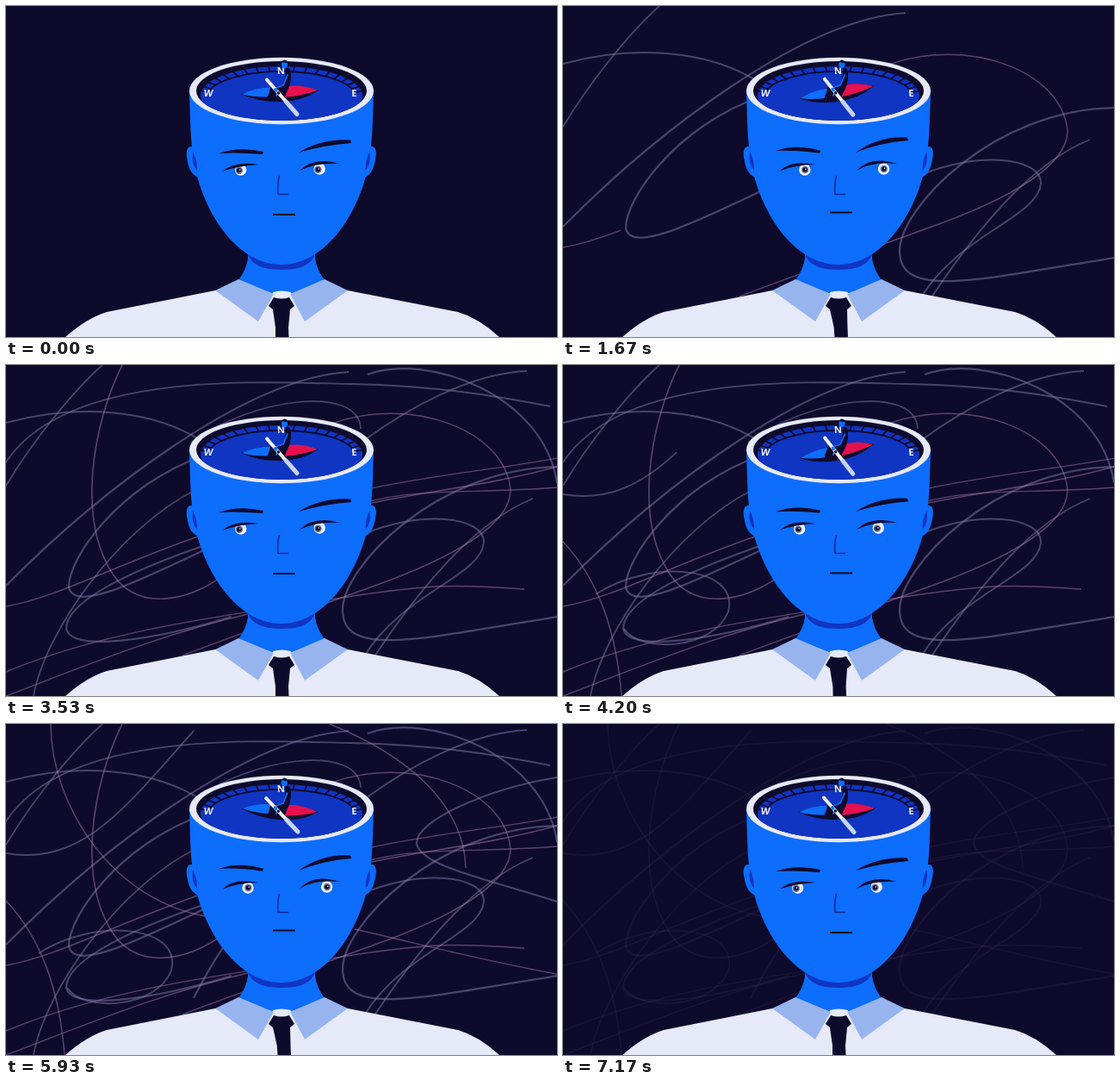
An HTML page with a canvas that plays this animation: 640 px wide and 384 px high, repeating every 7210 ms.

```html
<!DOCTYPE html>
<html lang="en">
<head>
<meta charset="utf-8">
<title>Inner compass</title>
<style>
  html, body { margin: 0; width: 100%; height: 100%; overflow: hidden; background: #0e0a2c; }
  canvas { display: block; width: 640px; height: 384px; }
</style>
</head>
<body>
<canvas id="stage" width="640" height="384"></canvas>
<script>
const ctx = document.getElementById('stage').getContext('2d');
const LOOP = 7210, SWAY = LOOP / 2;
const NIGHT = '#0e0a2c', SKIN = '#0d6dfd', DEEP = '#1035c3', SHIRT = '#e6e9f8',
      COLLAR = '#97b4ef', RED = '#e6104f', WHITE = '#f1f3fd';

const mix = (a, b, k) => a + (b - a) * k;

// Cosine easing through [phase, value] pairs.
function keyed(p, keys) {
  for (let i = 1; i < keys.length; i++) {
    const [p0, v0] = keys[i - 1], [p1, v1] = keys[i];
    if (p <= p1) return mix(v0, v1, (1 - Math.cos(Math.PI * (p - p0) / (p1 - p0))) / 2);
  }
  return keys[keys.length - 1][1];
}

function fill(color, d) {
  ctx.fillStyle = color;
  ctx.fill(new Path2D(d));
}

function line(color, width, d) {
  ctx.strokeStyle = color;
  ctx.lineWidth = width;
  ctx.stroke(new Path2D(d));
}

function oval(color, x, y, rx, ry = rx) {
  ctx.fillStyle = color;
  ctx.beginPath();
  ctx.ellipse(x, y, rx, ry, 0, 0, 7);
  ctx.fill();
}

// Pen lines: start time, duration, path, width.
const strokes = [];
function pen(start, span, d, width = 1.5) {
  const el = document.createElementNS('http://www.w3.org/2000/svg', 'path');
  el.setAttribute('d', d);
  strokes.push({ start, span, width, path: new Path2D(d), len: el.getTotalLength() });
}

pen(60, 300, 'M612 155C550 180 490 245 428 338', 1.5);
pen(260, 330, 'M640 118C500 120 390 235 391 285C392 340 480 318 640 292', 1.8);
pen(500, 320, 'M414 197C480 168 556 175 555 206C552 245 460 265 416 338', 1.6);
pen(480, 490, 'M205 337C270 312 360 281 420 259C520 224 586 185 586 145C580 75 470 35 378 68', 1.2);

pen(970, 230, 'M112 0C76 32 30 90 0 140');
pen(1080, 320, 'M398 8C280 15 110 145 0 256', 1.7);
pen(1330, 340, 'M230 105C130 140 72 225 73 258C80 288 155 250 240 210', 1.8);
pen(1450, 220, 'M0 67C80 45 170 50 230 90', 1.5);
pen(1600, 260, 'M0 280C60 270 130 230 240 193', 1.1);
pen(1750, 330, 'M0 356C120 306 260 290 390 270S540 257 602 260', 1.2);
pen(1860, 200, 'M0 384C90 350 180 312 285 288', 1.1);
pen(1900, 200, 'M605 7C540 10 470 48 415 88', 1.6);
pen(2000, 190, 'M415 145C490 128 570 121 640 108', 1);
pen(2130, 180, 'M415 162C490 146 560 140 640 118', 1.3);

pen(2330, 290, 'M0 113C70 5 300 20 400 22S570 36 632 48', 1.5);
pen(2560, 320, 'M135 0C100 70 82 180 125 244C155 288 220 275 268 232', 1.3);
pen(2830, 270, 'M420 11C490 -15 625 35 640 137', 1.7);
pen(3030, 200, 'M215 90C285 38 410 22 412 74', 1.4);
pen(3130, 240, 'M32 384C45 310 130 190 220 145', 1.4);
pen(3270, 240, 'M240 206C140 240 70 275 70 306C76 333 170 320 262 292', 1.7);
pen(3350, 180, 'M415 160C480 142 540 150 640 142', 1.1);

pen(3570, 320, 'M38 266C100 225 205 232 192 286C175 330 90 335 71 306', 1.6);
pen(3820, 250, 'M0 205C42 250 62 310 68 384', 1.2);
pen(4040, 300, 'M0 150C90 165 140 95 218 8', 1.5);
pen(4280, 400, 'M640 62C560 75 475 112 477 139C482 165 560 180 640 206', 1.7);

pen(4920, 340, 'M52 0C52 95 125 208 238 224', 1.2);
pen(5230, 250, 'M376 0C470 38 532 95 534 167', 1.2);
pen(5460, 200, 'M218 318C235 284 250 260 270 235', 1.7);
pen(5630, 270, 'M405 238C480 255 560 276 640 290', 1.1);

function scribble(t) {
  const fade = Math.min(1, Math.max(0, (7250 - t) / 500));
  ctx.globalAlpha = 0.5 * fade;
  ctx.lineCap = 'butt';
  for (const s of strokes) {
    const k = Math.min(1, (t - s.start) / s.span);
    if (k <= 0) continue;
    ctx.strokeStyle = s.width < 1.4 ? '#a27fae' : '#847da5';
    ctx.lineWidth = s.width * 1.25;
    ctx.setLineDash(k < 1 ? [s.len * k, s.len + 10] : []);
    ctx.stroke(s.path);
  }
  ctx.setLineDash([]);
  ctx.globalAlpha = 1;
  ctx.lineCap = 'round';
}

function bust(look) {
  fill(SHIRT, 'M69 384Q94 362 117 355L243 330L311 331H330L397 330L525 355Q549 362 573 384Z');
  fill(SKIN, 'M281 280V293Q279 306 270 318L308 333H333L370 318Q361 306 359 293V280Z');
  fill(DEEP, 'M281 288Q287 306 320 306Q353 306 359 288Z');
  fill(SHIRT, 'M310 332Q320 329 331 332L329 340H312Z');
  fill(COLLAR, 'M270 317L243 330L293 366L311 334Z');
  fill(COLLAR, 'M370 317L397 330L347 366L330 334Z');
  const s = look * 2.5;
  fill(NIGHT, `M311 338Q320 341 329 338L335 348L330 352L${328 + s} 373L${328.5 + s} 384` +
    `H${313 + s}L${313 + s * .7} 373L310 352L305 348Z`);

  fill(SKIN, 'M219 164C210 160 208.5 169 210.5 178C212 190 217 197 226 200Z');
  fill(SKIN, 'M421 164C430 160 431 169 429 178C427 190 423 197 414 200Z');
  fill(SKIN, 'M213 98C214 130 214 150 217 170C222 225 262 300 320 300' +
    'C378 300 418 225 423 170C426 150 426 130 427 98Z');
  fill(DEEP, 'M217 169Q222 177 222 191Q215 183 217 169Z');
  fill(DEEP, 'M422.5 169Q417.5 177 417.5 191Q424.5 183 422.5 169Z');
}

function eye(x, y, look) {
  oval(WHITE, x, y, 6.7);
  const px = x + mix(-1.8, .3, look), py = y + mix(.8, 0, look);
  oval('#6f7bab', px, py, 4.2);
  oval(NIGHT, px, py, 2.7);
  oval(WHITE, px + .8, py - .8, .8);
}

function face(look) {
  const x = mix(272.6, 281, look), up = look * 3;
  eye(x, 190, look);
  eye(x + 91.6, 189, look);
  const l = look * 1.5;
  fill(NIGHT, `M252 191.5Q${266 - l} ${179.5 - l} 293 184Q${270 - l} ${185.5 - l} 252 191.5Z`);
  fill(NIGHT, `M341 191Q${358 - l} ${174.5 - l} 388 183Q${360 - l} ${181.5 - l} 341 191Z`);
  fill(NIGHT, `M247 ${171 - up}Q270 ${162.5 - up} 299 ${169 - up * .4}L298 ${172 - up * .4}` +
    `Q269 ${169.5 - up} 247 ${171 - up}Z`);
  fill(NIGHT, `M340 170Q367 ${153.5 - up} 400 ${155.5 - up}L401 ${159 - up}Q368 ${161.5 - up} 340 170Z`);
  ctx.lineCap = 'butt';
  line('#142a9c', 1.6, 'M317.5 197Q315 207 316 218.5H328');
  line(NIGHT, 2, `M310 ${242 - look * 2.5}H336`);
  ctx.lineCap = 'round';
}

function letter(ch, x, y, skew) {
  ctx.save();
  ctx.transform(1, 0, skew, 1, x, y);
  ctx.fillStyle = WHITE;
  ctx.fillText(ch, 0, 0);
  ctx.restore();
}

function dial() {
  oval(SHIRT, 320, 98.5, 107, 38.7);
  ctx.save();
  ctx.beginPath();
  ctx.ellipse(320, 98.5, 99, 34.5, 0, 0, 7);
  ctx.clip();
  oval(NIGHT, 320, 98.5, 100, 36);
  oval(DEEP, 320, 104, 94, 34);
  ctx.strokeStyle = NIGHT;
  ctx.lineWidth = 1.8;
  ctx.beginPath();
  ctx.ellipse(320, 105, 86, 29, 0, Math.PI * 1.06, Math.PI * 1.94);
  ctx.stroke();
  for (let a = 189; a <= 351; a += 9) {
    const c = Math.cos(a * Math.PI / 180), s = Math.sin(a * Math.PI / 180);
    ctx.beginPath();
    ctx.moveTo(320 + 95 * c, 104 + 34 * s);
    ctx.lineTo(320 + 86 * c, 105 + 29 * s);
    ctx.stroke();
  }
  ctx.restore();
}

function letters() {
  ctx.font = '700 11px "Open Sans", "Noto Sans", sans-serif';
  ctx.textAlign = 'center';
  ctx.textBaseline = 'middle';
  letter('N', 319.5, 76, .08);
  letter('W', 235, 102.5, -.15);
  letter('E', 404.5, 102.5, .05);
}

function rower(deg) {
  const a = deg * Math.PI / 180, tx = Math.cos(a * .75), ty = -.4 * Math.sin(a);
  const pt = (u, v) => `${318 + u * tx} ${100 + u * ty + v} `;
  fill(NIGHT, `M${pt(-45, 1)}Q${pt(-22, -7)}${pt(0, -7)}Q${pt(25, -8)}${pt(45, -1)}` +
    `Q${pt(25, 12)}${pt(0, 11)}Q${pt(-24, 11)}${pt(-45, 1)}Z`);
  fill(SKIN, `M${pt(-44, 1)}Q${pt(-28, -6)}${pt(-11, -6)}L${pt(-13, 5)}Q${pt(-30, 5)}${pt(-44, 1)}Z`);
  fill(RED, `M${pt(10, -7)}Q${pt(28, -8)}${pt(44, -1)}Q${pt(26, 5)}${pt(6, 6)}Z`);

  const k = (deg - 4) / 33, lean = k * .8;
  ctx.lineJoin = 'round';
  line(NIGHT, 4.5, 'M323 98L310 95L306 106');
  line(NIGHT, 4.5, 'M324 99L316 99L313 107');
  fill(NIGHT, `M${325 + lean} 72Q330 70 331 78Q332 92 324 103L318 99Q325 89 ${325 + lean} 72Z`);
  line(SKIN, 1.8, `M${327 + lean} 80L322 92L313 95`);
  line('#3c86f4', 1.6, 'M316 99L314 104');
  oval(SKIN, 323.5 + lean, 68, 3.6, 4);
  fill(NIGHT, `M${320 + lean} 65Q${323 + lean} 60 ${328 + lean} 65L${325 + lean} 66Z`);

  const x0 = 303 + k * 2, y0 = 85.5 - k * 1.6, x1 = 338 - k * 2.2, y1 = 125.5 + k * 1.3;
  const on = (f) => `${mix(x0, x1, f)} ${mix(y0, y1, f)}`;
  line(WHITE, 4, `M${on(0)}L${on(1)}`);
  line('#c4d3f7', 5, `M${on(.64)}L${on(1)}`);
  line(SKIN, 3.4, `M${on(.28)}L${on(.31)}`);
  line(NIGHT, 3, `M${on(.38)}l.4 .5`);
}

function draw(t) {
  const p = (t % SWAY) / SWAY;
  const look = keyed(p, [[0, 0], [.5, 1], [.68, 1], [1, 0]]);
  const turn = keyed(p, [[0, 4], [.31, 38], [.68, -11], [1, 4]]);
  ctx.fillStyle = NIGHT;
  ctx.fillRect(0, 0, 640, 384);
  scribble(t);
  bust(look);
  face(look);
  dial();
  letters();
  rower(turn);
}

const begin = performance.now();
function tick() {
  draw((performance.now() - begin) % LOOP);
  requestAnimationFrame(tick);
}
tick();
</script>
</body>
</html>
```
